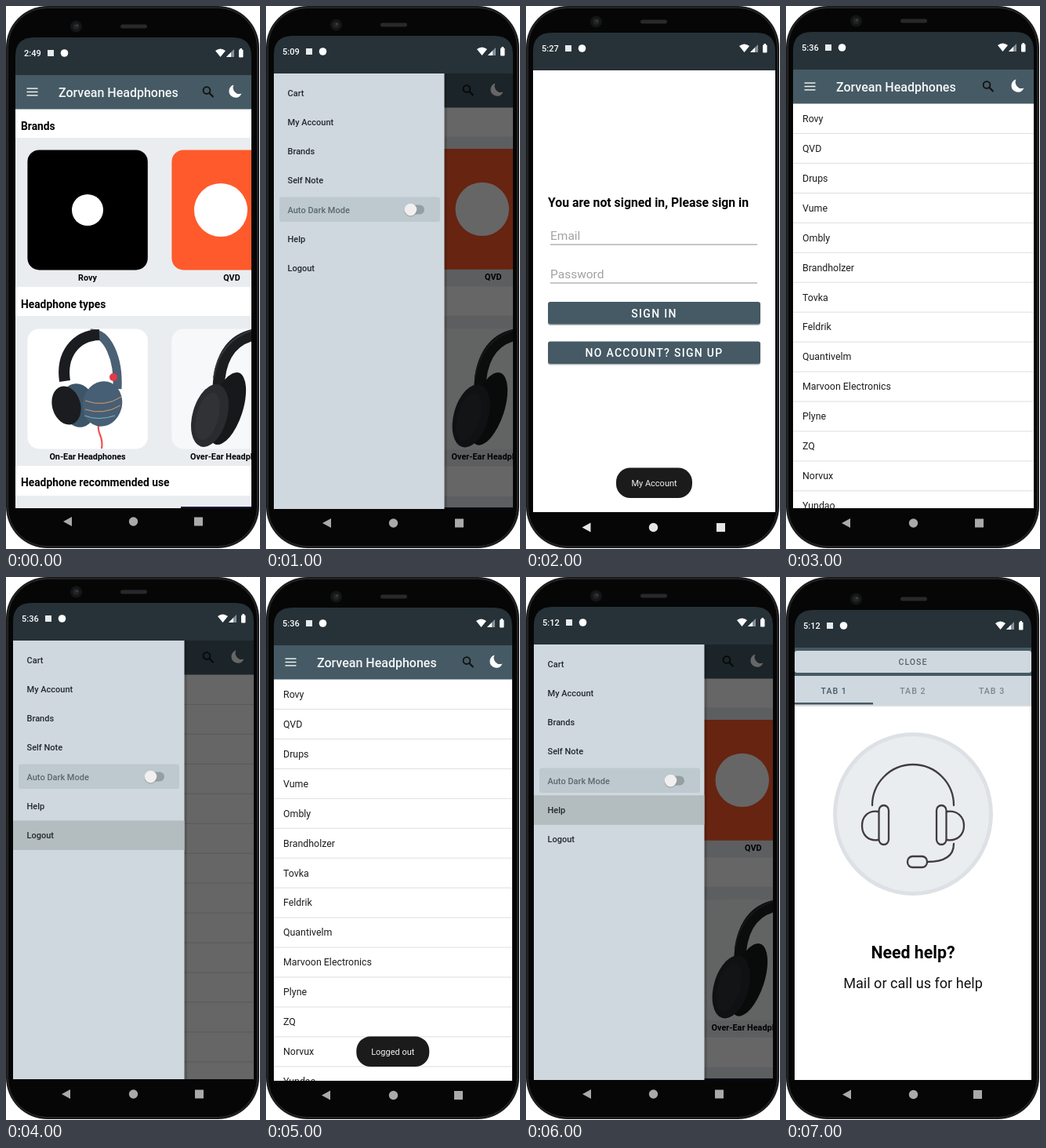
Animation, 324 px wide and 692 px high, one loop 8000 ms. Source, as an HTML page:

```html
<!DOCTYPE html>
<html lang="en">
<head>
<meta charset="utf-8">
<title>Shop app tour</title>
<style>
  html, body { margin: 0; width: 100%; height: 100%; overflow: hidden; background: #fff; }
  #stage { display: block; width: 324px; height: 692px; font-family: Roboto, sans-serif; }
</style>
</head>
<body>
<svg id="stage" viewBox="0 0 324 692"></svg>
<script>
const SLATE = '#455a64', DARK = '#263238', MIST = '#cfd8df', PALE = '#eaedf0';
const BRANDS = ['Rovy', 'QVD', 'Drups', 'Vume', 'Ombly', 'Brandholzer', 'Tovka', 'Feldrik',
  'Quantivelm', 'Marvoon Electronics', 'Plyne', 'ZQ', 'Norvux', 'Yundao'];
const MENU = ['Cart', 'My Account', 'Brands', 'Self Note', 'Auto Dark Mode', 'Help', 'Logout'];

const rect = (x, y, w, h, fill, r = 0, more = '') =>
  `<rect x="${x}" y="${y}" width="${w}" height="${h}" rx="${r}" fill="${fill}" ${more}/>`;
const circle = (x, y, r, fill, more = '') => `<circle cx="${x}" cy="${y}" r="${r}" fill="${fill}" ${more}/>`;
const oval = (x, y, rx, ry, fill, turn = 0) =>
  `<ellipse cx="${x}" cy="${y}" rx="${rx}" ry="${ry}" fill="${fill}" transform="rotate(${turn} ${x} ${y})"/>`;
const path = (d, fill) => `<path d="${d}" fill="${fill}"/>`;
const line = (d, color, width, cap = 'butt') =>
  `<path d="${d}" fill="none" stroke="${color}" stroke-width="${width}" stroke-linecap="${cap}"/>`;
const text = (x, y, size, str, { weight = 400, fill = '#000', anchor = 'start', gap = 0 } = {}) =>
  `<text x="${x}" y="${y}" font-size="${size}" font-weight="${weight}" fill="${fill}" text-anchor="${anchor}" letter-spacing="${gap}">${str}</text>`;

function appBar({ L, R, T }) {
  const y = T + 21.5, m = R - 20.5;
  let out = rect(L, T, R - L, 43.5, SLATE);
  for (const d of [-4.4, 0, 4.4]) out += rect(L + 14.5, y + d - .7, 14, 1.4, '#f4f6f7');
  return out + text(L + 55, T + 28, 16, 'Zorvean Headphones', { weight: 500, fill: '#f4f6f7' }) +
    circle(256, y - 2, 4.4, 'none', 'stroke="#111" stroke-width="1.8"') +
    line(`M259 ${y + 1}L264.5 ${y + 6.5}`, '#111', 2.2) +
    path(`M${m - 2} ${y - 9}A8.3 8.3 0 1 0 ${m + 8} ${y + 2}A8 8 0 0 1 ${m - 2} ${y - 9}Z`, '#fff');
}

function onEar() {
  return line('M118 534C116 546 125 548 122 564', '#ef5350', 2.2) +
    line('M108 417C130 416 144 450 142 488', '#4a6074', 11) +
    line('M75 478C70 445 88 420 119 419', '#1b1c1f', 14) +
    oval(92, 509, 22, 28, '#3d5568', -14) + oval(123, 507, 25, 29, '#465f74', 14) +
    line('M101 503Q126 512 147 498M101 514Q124 522 146 509', '#d99a6a', 1) +
    line('M100 522Q118 529 139 522', '#7fb3c8', 1) +
    oval(77, 509, 18, 25, '#1b1c1f', -16) + circle(137, 473, 5, '#e53945');
}

function overEar() {
  return line('M271 488C272 444 291 422 322 418', '#1c1d1f', 15) +
    line('M265 474C269 442 288 421 315 413', '#34363a', 2) +
    oval(282, 513, 20, 48, '#17181a', 18) + oval(260, 522, 22, 41, '#292b2e', 16) +
    oval(257, 523, 14, 31, '#303235', 16);
}

// Laid out for a 12..313 wide screen, then fitted to the current one.
function home(screen) {
  const { R, T, B } = screen, s = (B - T) / 552;
  const head = { weight: 700 }, label = { weight: 700, anchor: 'middle' };
  const bands = [168, 395, 624].map((y, i) => rect(0, y, 330, [190, 191, 40][i], PALE)).join('');
  const tile = (x, y, fill) => rect(x + .4, y + .4, 153.4, 153, fill, 15);
  return `<g transform="translate(${R - 313 * s} ${T - 88 * s}) scale(${s})">` +
    rect(0, 131, 330, 520, '#fff') + bands +
    text(19, 158, 13.8, 'Brands', head) + text(19, 385, 13.8, 'Headphone types', head) +
    text(19, 612, 13.8, 'Headphone recommended use', head) +
    tile(27, 183, '#000') + circle(104, 260, 20, '#fff') +
    tile(211, 183, '#ff5a2b') + circle(274, 260, 34, '#fff') +
    text(104, 350, 10.8, BRANDS[0], label) + text(288, 350, 10.8, BRANDS[1], label) +
    tile(27, 411, '#fff') + onEar() + tile(211, 411, '#f7f8f9') + overEar() +
    text(104, 577.5, 10.8, 'On-Ear Headphones', label) +
    text(235, 577.5, 10.8, 'Over-Ear Headphones', head) +
    rect(223, 638, 100, 4, '#1b1b3a') + '</g>' + appBar(screen);
}

function list(screen) {
  const { L, R, T, B } = screen, top = T + 43.5, step = 37.95;
  return rect(L, top, R - L, B - top, '#fff') + BRANDS.map((name, i) =>
    text(L + 12, top + i * step + 23.3, 12.4, name, { fill: '#1d1d1d' }) +
    rect(L, top + (i + 1) * step - .5, R - L, 1, '#dedede')).join('') + appBar(screen);
}

function drawer({ L, R, T, B }, active) {
  const step = 37.15, row = i => T + 25 + i * step;
  let out = rect(L, T, R - L, B - T, '#000', 0, 'opacity=".6"') +
    rect(227, T, 4, B - T, '#000', 0, 'opacity=".15"') + rect(L, T, 227.5 - L, B - T, MIST);
  if (active >= 0) out += rect(L, row(active) - 18.5, 227.5 - L, 37.5, '#b3bcbe');
  out += rect(L + 7, row(4) - 16, 205, 31.5, '#bdc9ce', 3) +
    rect(178, row(4) - 6, 24, 12, '#959fa3', 6) +
    circle(184.5, row(4) + .8, 8, '#000', 'opacity=".2"') + circle(184.5, row(4), 7.8, '#f1efef');
  return out + MENU.map((name, i) =>
    text(L + 17.5, row(i) + 4, 11, name, { weight: 500, fill: i === 4 ? '#5b686e' : '#23292c' })).join('');
}

function toast(x, y, w, str) {
  return rect(x, y, w, 38.5, '#1b1b1b', 18) +
    text(x + w / 2, y + 23.5, 11, str, { fill: '#f2f2f2', anchor: 'middle' });
}

function signIn() {
  const field = (y, name) => text(31, y, 15.5, name, { fill: '#a2a2a2' }) + rect(31, y + 5.5, 264, 1, '#8f8f8f');
  const button = (y, name) => rect(28, y + 1.5, 271, 28.5, '#b5babd', 3) + rect(28, y, 271, 28.5, SLATE, 3) +
    text(163.5, y + 19.5, 14, name, { weight: 500, fill: '#fff', anchor: 'middle', gap: 1.3 });
  return text(28, 256, 15.8, 'You are not signed in, Please sign in', { weight: 700 }) +
    field(298, 'Email') + field(347, 'Password') +
    button(377, 'SIGN IN') + button(427.5, 'NO ACCOUNT? SIGN UP') + toast(115, 588.5, 97, 'My Account');
}

function help({ L, R }) {
  const w = R - L, ink = '#403c40';
  const caps = fill => ({ weight: 500, fill, anchor: 'middle', gap: 1 });
  const pill = (x, y, pw, ph) => rect(x, y, pw, ph, 'none', 6.5, `stroke="${ink}" stroke-width="2.3"`);
  return rect(L, 90, w, 37, SLATE) + rect(L, 94, w, 28, MIST, 3) +
    text(162, 112, 10.6, 'CLOSE', caps('#56636a')) +
    rect(L, 163, w, 2, '#dadcdd') + rect(L, 126, w, 37, MIST) + rect(L, 160, 100, 2.5, SLATE) +
    [1, 2, 3].map(n => text(n * 100.7 - 39.5, 149, 10.6, 'TAB ' + n, caps(n === 1 ? SLATE : '#7b868c'))).join('') +
    oval(162, 302, 102, 104, '#dde1e6') + oval(162, 302, 97, 99, PALE) +
    line('M110 291A52 52 0 0 1 214 291M118 299C104 297 97 306 97 317S104 337 118 335' +
      'M205 299C219 297 227 306 227 317S219 337 205 335M214 340C214 354 204 363 180 363', ink, 2.3, 'round') +
    pill(118.5, 291, 12.5, 50) + pill(192, 291, 12.5, 50) + pill(155, 356, 25, 14) +
    text(162, 486, 21.3, 'Need help?', { weight: 700, anchor: 'middle' }) +
    text(162, 524, 18.1, 'Mail or call us for help', { anchor: 'middle', fill: '#111' });
}

function body({ T }) {
  const y = T - 62;
  return rect(0, 0, 323, 691, '#1b1b1c', 53) + rect(2.5, 2.5, 318, 686, '#060606', 50, 'stroke="#2a2b2c"') +
    circle(89.5, y, 7.5, '#141516') + circle(89.5, y, 4, '#222426') + circle(90.5, y - 1, 1.3, '#404346') +
    rect(146, y - 2.5, 34, 5, '#29292b', 2.5);
}

function statusBar({ L, R, T, clock }) {
  const y = T - 28, top = T - 48;
  return path(`M${L} ${T}V${top + 24}Q${L} ${top} ${L + 24} ${top}H${R - 24}Q${R} ${top} ${R} ${top + 24}V${T}Z`, DARK) +
    text(L + 11, y + 4, 11, clock, { weight: 500, fill: '#fff' }) +
    rect(L + 41, y - 4, 8, 8, '#e8ebec') + circle(L + 62.5, y, 4.8, '#fff') +
    path(`M${R - 46} ${y - 3}Q${R - 39.5} ${y - 8} ${R - 33} ${y - 3}L${R - 39.5} ${y + 5}Z`, '#fff') +
    path(`M${R - 32} ${y + 5}H${R - 22}V${y - 5}Z`, '#87919a') + path(`M${R - 32} ${y + 5}H${R - 26}V${y - 1}Z`, '#fff') +
    rect(R - 16, y - 4.5, 5.5, 10, '#fff', 1) + rect(R - 14.5, y - 6, 2.5, 2, '#fff');
}

function navBar({ nav: [y, back, recent], tint = '#aaa' }) {
  return path(`M${back - 6} ${y}L${back + 5} ${y - 6}V${y + 6}Z`, tint) +
    circle(162.5, y, 5.7, tint) + rect(recent - 5.5, y - 5.5, 11, 11, tint);
}

// L, R, B: screen edges; T: lower edge of the status bar.
const scenes = [
  { L: 12, R: 313, T: 88, B: 640, clock: '2:49', nav: [657, 79, 245.5], view: home },
  { L: 10, R: 315, T: 86, B: 641, clock: '5:09', nav: [659, 78, 246.5], view: s => home(s) + drawer(s) },
  { L: 9, R: 318, T: 82, B: 645, clock: '5:27', nav: [664.5, 77.5, 248.5], tint: '#e6e6e6', view: signIn },
  { L: 9, R: 316, T: 81, B: 640, clock: '5:36', nav: [659, 77, 246.5], view: list },
  { L: 9, R: 316, T: 81, B: 640, clock: '5:36', nav: [659, 77, 246.5], view: s => list(s) + drawer(s, 6) },
  { L: 10, R: 314, T: 87, B: 642, clock: '5:36', nav: [660.5, 77, 245.5],
    view: s => list(s) + toast(115.3, 585.6, 93, 'Logged out') },
  { L: 10, R: 315, T: 86, B: 641, clock: '5:12', nav: [659, 78, 246.5], view: s => home(s) + drawer(s, 5) },
  { L: 11, R: 313, T: 90, B: 641, clock: '5:12', nav: [659.5, 78, 244.5], view: help }
];

function render(s) {
  const w = s.R - s.L, h = s.B - s.T;
  return body(s) +
    `<svg x="${s.L}" y="${s.T}" width="${w}" height="${h}" viewBox="${s.L} ${s.T} ${w} ${h}" overflow="hidden">` +
    rect(s.L, s.T, w, h, '#fff') + s.view(s) + '</svg>' + statusBar(s) + navBar(s);
}

const stage = document.getElementById('stage');
const pages = scenes.map(render);
let shown = -1;
function tick() {
  const index = Math.floor(performance.now() % 8000 / 1000);
  if (index !== shown) stage.innerHTML = pages[shown = index];
  requestAnimationFrame(tick);
}
tick();
</script>
</body>
</html>
```
